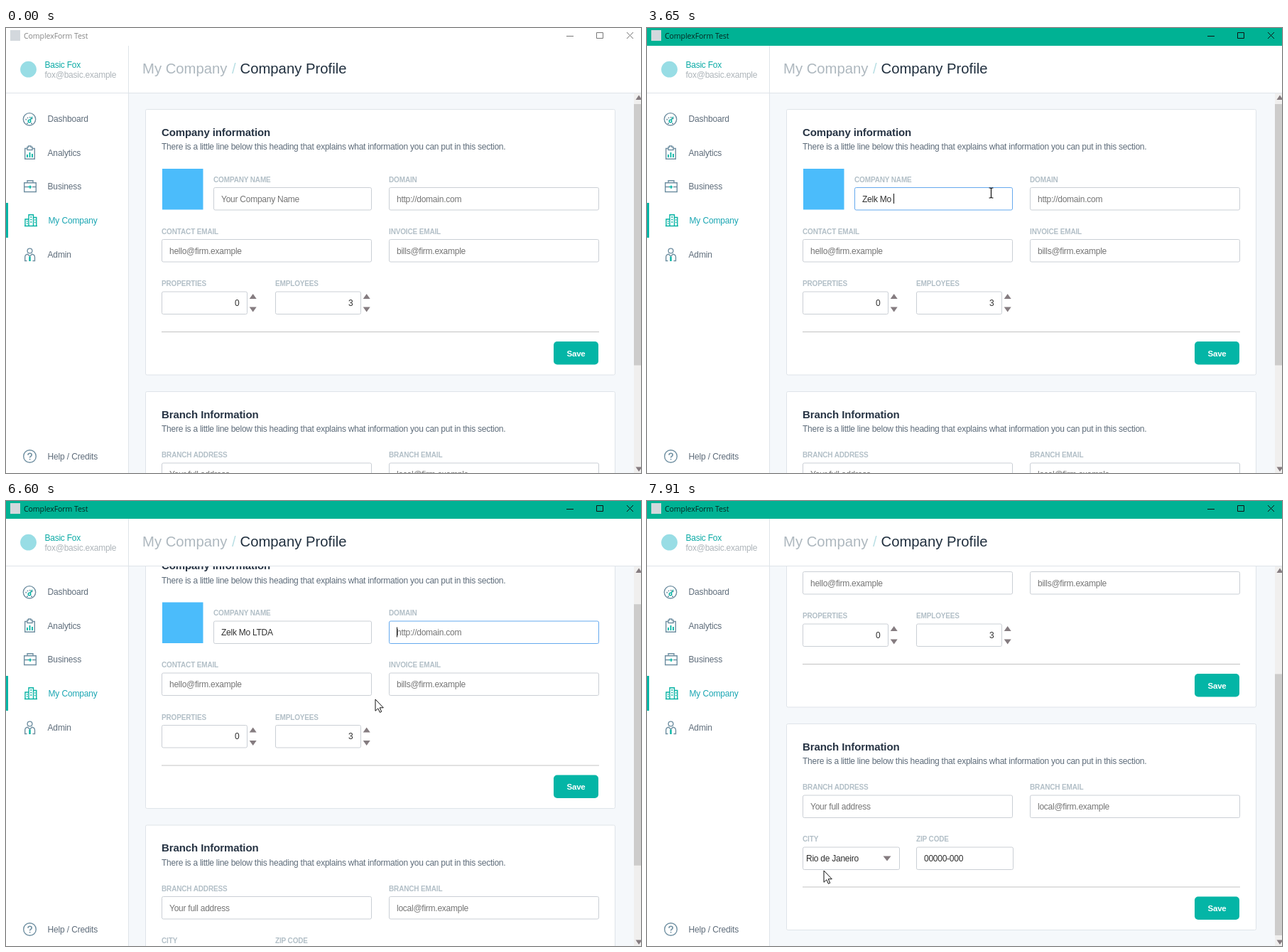
These frames come from a looping animation (894x626 px, 7.99 s). An HTML page:

```html
<!DOCTYPE html>
<html lang="en">
<head>
<meta charset="utf-8">
<title>ComplexForm Test</title>
<style>
  html, body { margin: 0; width: 100%; height: 100%; overflow: hidden; background: #fff; }
  svg { display: block; }
  text { font: 12px "Liberation Sans", Arial, sans-serif; letter-spacing: -.25px; white-space: pre; fill: #5f6d7b; }
  .win { font: 10.5px "Open Sans", sans-serif; letter-spacing: -.05px; }
  .nav { letter-spacing: -.15px; }
  .crumb { font-size: 20.3px; letter-spacing: 0; fill: #aeb8bf; }
  .head { font-size: 15px; font-weight: bold; letter-spacing: -.1px; fill: #273444; }
  .label { font-size: 10px; font-weight: bold; letter-spacing: -.15px; fill: #b2bfc7; }
  .hint { fill: #757575; }
  .value { fill: #303030; }
  .save { font-size: 11.5px; font-weight: bold; fill: #fff; text-anchor: middle; }
  .icon { fill: none; stroke: #7090a2; stroke-width: 1.4; }
  .accent { stroke: #06b3a4; }
</style>
</head>
<body>
<svg id="stage" width="894" height="626" viewBox="0 0 894 626"></svg>
<script>
const LOOP = 7990, STEP = LOOP / 103;
const TEAL = '#04b5a6', EDGE = '#dfe4e9', FIELD = '#cacfd5', FOCUS = '#65a9ee';
const COMPANY = 'Zelk Mo LTDA';
const KEY_TIMES = [1780, 1930, 2170, 2400, 2550, 2930, 3250, 3650, 4110, 4430, 4750, 4900];
const CARET_ON = [[70, 540], [1080, 1460], [1780, 5820], [6290, 6830]];
const SCROLLS = [[6600, 55.5], [6760, 111], [7140, 166.5], [7290, 198]];
// time, x, y of the pointer's hot spot
const PATH = [
  [150, 404, 598], [300, 408, 540], [480, 416, 400], [700, 424, 262], [845, 425.5, 236],
  [1010, 425.5, 236], [1460, 477.5, 231], [1620, 478.5, 230.5], [1710, 478.5, 230.5],
  [2170, 481.5, 231], [2400, 482.5, 231.5], [2920, 484.5, 232], [5800, 484.5, 232],
  [5890, 497, 205], [6120, 508, 216], [6360, 525, 254], [6590, 520, 279],
  [7290, 520, 279], [7600, 400, 390], [7910, 249, 520]
];

const text = (x, y, s, cls = '', attrs = '') => `<text x="${x}" y="${y}" class="${cls}" ${attrs}>${s}</text>`;
const rect = (x, y, w, h, fill, attrs = '') => `<rect x="${x}" y="${y}" width="${w}" height="${h}" fill="${fill}" ${attrs}/>`;
const path = (d, attrs = '') => `<path d="${d}" ${attrs}/>`;
const box = (x, y, w, h, stroke, id = '') =>
  rect(x + .5, y + .5, w - 1, h - 1, '#fff', `rx="2" stroke="${stroke}" id="${id}"`);

const inputs = [];
function input(x, y, w, label, value, cls = 'hint', id = '') {
  inputs.push([x, y, w, 32]);
  return text(x, y - 7.5, label, 'label') + box(x, y, w, 32.5, FIELD, id) +
    text(x + 11, y + 20.5, value, cls, id && `id="${id}Text"`);
}

const tri = (x, y, w, h) => path(`M${x - w / 2} ${y}h${w}L${x} ${y + h}z`, 'fill="#857c80"');

function spinner(x, label, value) {
  return input(x, 370.5, 121, label, '', 'value') +
    text(x + 109.5, 390.5, value, 'value', 'text-anchor="end"') +
    tri(x + 128.7, 381, 10, -7) + tri(x + 128.7, 392.5, 10, 7);
}

function card(y, h, title, lineY, body) {
  return rect(196.5, y + .5, 661, h, '#fff', `rx="2" stroke="${EDGE}"`) +
    text(219, y + 37.5, title, 'head') +
    text(219, y + 57, 'There is a little line below this heading that explains what information you can put in this section.') +
    body + path(`M219 ${lineY}H835`, 'stroke="#c3c3c3"') +
    rect(771, lineY + 13.5, 63, 32.5, TEAL, 'rx="5"') +
    text(802.5, lineY + 34, 'Save', 'save');
}

const companyCard = () => card(114, 373.5, 'Company information', 427.5,
  rect(220, 198, 57.5, 57.5, '#4bbcfb') +
  input(292, 224, 223, 'COMPANY NAME', 'Your Company Name', 'hint', 'company') +
  input(539, 224, 296, 'DOMAIN', 'http://domain.com', 'hint', 'domain') +
  input(219, 297, 296, 'CONTACT EMAIL', 'hello@firm.example') +
  input(539, 297, 296, 'INVOICE EMAIL', 'bills@firm.example') +
  spinner(219, 'PROPERTIES', 0) + spinner(379, 'EMPLOYEES', 3));

const branchCard = () => card(511, 290, 'Branch Information', 741,
  input(219, 611.5, 296, 'BRANCH ADDRESS', 'Your full address') +
  input(539, 611.5, 296, 'BRANCH EMAIL', 'local@firm.example') +
  text(219, 677, 'CITY', 'label') + box(219, 684.5, 137, 32.5, FIELD) +
  text(224, 705, 'Rio de Janeiro', 'value') + tri(338, 697.5, 11, 7) +
  input(379, 684.5, 137, 'ZIP CODE', '00000-000', 'value'));

const icons = [
  // dashboard
  `<circle cx="33" cy="128.3" r="8.7"/><circle cx="33" cy="131" r="1.8" class="accent"/>` +
    path('M34 129.5L37 125', 'class="accent"') +
    path('M28 129.5A5.2 5.2 0 0 1 38 129.5', 'stroke-dasharray="1.6 1.7" stroke-width="1.8"') +
    path('M29 134.3H31M35 134.3H37'),
  // analytics
  path('M30 169.5H26.7V184.3H40.3V169.5H37M30 167.5H31.5V166H35V167.5H37V171.5H30z') +
    path('M30 182V178M33.5 182V175M37 182V177', 'class="accent" stroke-width="1.8"'),
  // business
  path('M25.7 217.7H42.3V230.5H25.7zM30 217.5V214.7H38V217.5M26 223.5H31M37 223.5H42') +
    path('M31 223.5H36M34 221.5V226', 'class="accent"'),
  // company
  path('M26 278.5H44M27 278V269H32M32 278V262.7H38.5V278M38.5 266.5H42.8V278M34.2 266H36.3M34.2 269.5H36.3M34.2 273H36.3M40 270H41.5M40 273.5H41.5M29 272H30.5M29 275H30.5', 'class="accent"'),
  // admin
  `<circle cx="33.5" cy="313.5" r="3.4"/>` +
    path('M29.5 327.5H26.7V322.5Q26.7 318.5 30.5 318.2L33.5 321L36.5 318.2Q40.5 318.5 40.5 322.5V327.5H37.5') +
    path('M33.5 321.5V328', 'class="accent" stroke-width="2.4"'),
  // help
  `<circle cx="33.5" cy="602.5" r="8.8"/>` +
    path('M31 600.7Q31 598.2 33.6 598.2Q36.2 598.2 36.2 600.4Q36.2 601.8 34.6 602.6Q33.6 603.2 33.6 604.6M33.6 606V607.5', 'stroke-width="1.6"')
];

const nav = [['Dashboard', 132.3], ['Analytics', 179.5], ['Business', 227], ['My Company', 274.8], ['Admin', 323], ['Help / Credits', 606.7]];

const sidebar = () =>
  rect(0, 25, 172, 601, '#fff') + rect(172, 25, 1, 601, EDGE) + rect(0, 91, 894, 1, EDGE) +
  '<circle cx="31.5" cy="58.2" r="11.4" fill="#98dde5"/>' +
  text(54.5, 55.5, 'Basic Fox', '', 'style="fill:#0dabA6"') +
  text(54.5, 69.5, 'fox@basic.example', '', 'style="fill:#aeb5ba"') +
  rect(0, 246, 3, 49, TEAL) + `<g class="icon">${icons.join('')}</g>` +
  nav.map(([s, y], i) => text(i === 3 ? 59.5 : 58.5, y, s, 'nav', i === 3 ? 'style="fill:#1ba6b3"' : '')).join('');

const stage = document.getElementById('stage');
stage.innerHTML =
  '<defs><clipPath id="view"><rect x="173" y="92" width="721" height="534"/></clipPath></defs>' +
  rect(0, 0, 894, 626, '#fff') + rect(173, 92, 721, 534, '#f5f8fb') +
  `<g clip-path="url(#view)"><g id="page">${companyCard()}${branchCard()}` +
    path('', 'id="caret" stroke="#111"') + '</g>' +
    rect(884, 92, 10, 534, '#f0efee') + rect(884, 107, 10, 367.5, '#cdcccb', 'id="thumb"') +
    tri(891, 101, 9, -6.5) + tri(891, 617.5, 9, 6.5) + '</g>' +
  sidebar() +
  text(192, 64, 'My Company', 'crumb') + text(318, 64, '/', 'crumb', 'style="fill:#b9dfe4"') +
  text(329.5, 64, 'Company Profile', 'crumb', 'style="fill:#21303f"') +
  rect(0, 0, 894, 25, '#fff', 'id="bar"') + rect(6, 3, 14, 15, '#d3d8dd') +
  text(25, 14.8, 'ComplexForm Test', 'win', 'id="title"') +
  path('M789 11.5H799M831.5 6.5H840.5V14.5H831.5zM874 6L883 15M883 6L874 15', 'id="controls" fill="none"') +
  path('M0 0V16.3L3.8 12.8L6.4 18.4L8.7 17.3L6.2 11.8H11.3z', 'id="arrow" fill="#fff" stroke="#111" stroke-width="1"') +
  path('M-3 -7H-1L0 -6L1 -7H3M0 -6V6M-3 7H-1L0 6L1 7H3', 'id="beam" fill="none" stroke="#111" stroke-width="1.2"');

const el = {};
stage.querySelectorAll('[id]').forEach(n => { if (n.id) el[n.id] = n; });
const show = (n, on) => n.setAttribute('visibility', on ? 'visible' : 'hidden');

function pointerAt(t) {
  const snapped = Math.floor((t + 8) / STEP) * STEP;
  if (snapped < PATH[0][0]) return null;
  const i = PATH.findIndex(k => k[0] > snapped);
  if (i < 0) return PATH[PATH.length - 1].slice(1);
  const [t0, x0, y0] = PATH[i - 1], [t1, x1, y1] = PATH[i];
  const p = (snapped - t0) / (t1 - t0);
  return [x0 + (x1 - x0) * p, y0 + (y1 - y0) * p];
}

function render(t) {
  const active = t >= 70, onDomain = t >= 5360;
  const scroll = SCROLLS.reduce((v, [at, y]) => t >= at ? y : v, 0);

  el.bar.setAttribute('fill', active ? '#00b294' : '#fff');
  el.title.style.fill = active ? '#06251f' : '#858585';
  el.controls.setAttribute('stroke', active ? '#111' : '#777');

  el.page.setAttribute('transform', `translate(0 ${-scroll})`);
  el.thumb.setAttribute('y', 107 + scroll * .689);
  el.company.setAttribute('stroke', active && !onDomain ? FOCUS : FIELD);
  el.domain.setAttribute('stroke', onDomain ? FOCUS : FIELD);

  const typed = COMPANY.slice(0, KEY_TIMES.filter(k => t >= k).length);
  el.companyText.textContent = typed || 'Your Company Name';
  el.companyText.setAttribute('class', typed ? 'value' : 'hint');
  const caretX = onDomain ? 550.5 : Math.round(303 + (typed ? el.companyText.getComputedTextLength() : 0)) + .5;
  el.caret.setAttribute('d', `M${caretX} 233V247`);
  show(el.caret, CARET_ON.some(([a, b]) => t >= a && t < b));

  const p = pointerAt(t);
  const beam = p && inputs.some(([x, y, w, h]) =>
    p[0] > x && p[0] < x + w && p[1] + scroll > y && p[1] + scroll < y + h);
  show(el.arrow, p && !beam);
  show(el.beam, beam);
  if (p) (beam ? el.beam : el.arrow).setAttribute('transform', `translate(${p[0]} ${p[1]})`);
}

const start = performance.now();
function tick(now) {
  render(Math.max(0, now - start) % LOOP);
  requestAnimationFrame(tick);
}
render(0);
requestAnimationFrame(tick);
</script>
</body>
</html>
```
